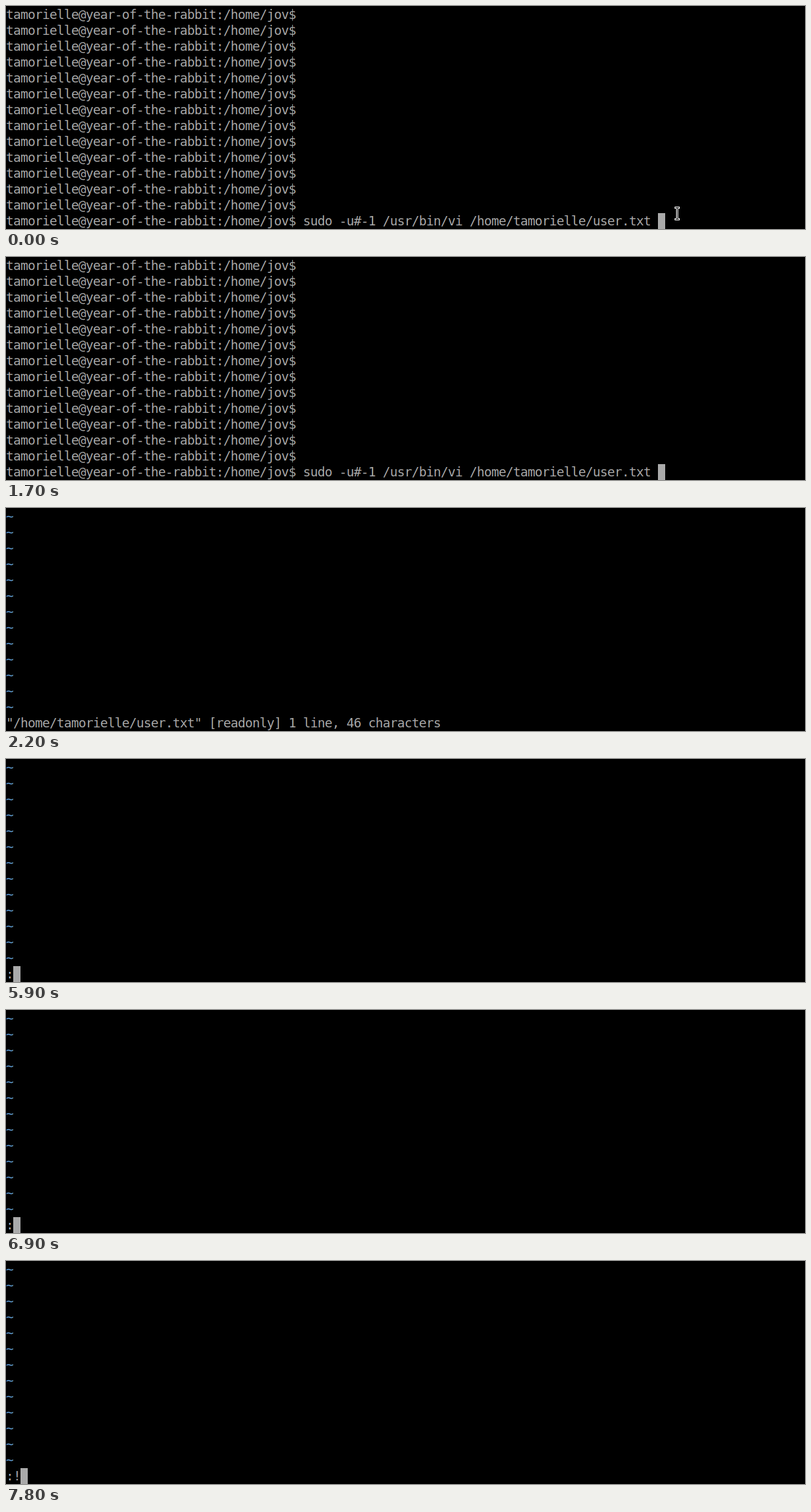
An HTML page with a canvas that plays this animation: 1103 by 309 pixels, repeating every 8000 ms.

```html
<!DOCTYPE html>
<html lang="en">
<head>
<meta charset="utf-8">
<title>Terminal session</title>
<style>
  html, body { margin: 0; width: 100%; height: 100%; overflow: hidden; background: #000; }
  canvas { display: block; }
</style>
</head>
<body>
<canvas id="screen" width="1103" height="309"></canvas>
<script>
const ctx = document.getElementById('screen').getContext('2d', { alpha: false });

const LOOP = 8000;
const CELL_W = 10, CELL_H = 22, TOP = 1, BASELINE = 17;
const LAST_ROW = 13;
const GREY = [170, 170, 170], BLUE = [95, 158, 216];

const PROMPT = 'tamorielle@year-of-the-rabbit:/home/jov$';
const FILE = '/home/tamorielle/user.txt';
const COMMAND = `${PROMPT} sudo -u#-1 /usr/bin/vi ${FILE}`;
const STATUS = `"${FILE}" [readonly] 1 line, 46 characters`;

// Characters sit in terminal cells; the colour channels are a third of a
// pixel apart, like subpixel antialiasing on an RGB screen.
function print(text, row, [r, g, b] = GREY) {
  const y = TOP + row * CELL_H + BASELINE;
  const channels = [[`rgb(${r},0,0)`, 1 / 3], [`rgb(0,${g},0)`, 0], [`rgb(0,0,${b})`, -1 / 3]];
  ctx.globalCompositeOperation = 'lighter';
  for (const [color, shift] of channels) {
    ctx.fillStyle = color;
    [...text].forEach((ch, col) => ctx.fillText(ch, col * CELL_W + shift, y));
  }
  ctx.globalCompositeOperation = 'source-over';
}

function fillRows(text, count, color) {
  for (let row = 0; row < count; row++) print(text, row, color);
}

function block(col) {
  ctx.fillStyle = `rgb(${GREY})`;
  ctx.fillRect(col * CELL_W, TOP + LAST_ROW * CELL_H, CELL_W, CELL_H);
}

function beamPointer(x, y) {
  ctx.fillStyle = '#fff';
  ctx.fillRect(x, y, 7, 3);
  ctx.fillRect(x + 2, y, 3, 19);
  ctx.fillRect(x, y + 16, 7, 3);
  ctx.fillStyle = '#000';
  ctx.fillRect(x + 1, y + 1, 5, 1);
  ctx.fillRect(x + 3, y + 1, 1, 17);
  ctx.fillRect(x + 1, y + 17, 5, 1);
}

const within = (t, from, to) => t >= from && t < to;

function drawShell(t) {
  const entered = t >= 1900;
  const commandRow = entered ? LAST_ROW - 1 : LAST_ROW;
  fillRows(PROMPT, commandRow);
  print(COMMAND, commandRow);
  if (entered) block(0);
  else if (!within(t, 600, 1200)) block(COMMAND.length + 1);
  if (t < 1700) beamPointer(923, 278);
}

function drawEditor(t) {
  fillRows('~', LAST_ROW, BLUE);
  if (t < 5900) {
    print(STATUS, LAST_ROW);
    return;
  }
  const typed = t < 7800 ? ':' : ':!';
  print(typed, LAST_ROW);
  const hidden = within(t, 6300, 6900) || within(t, 7500, 7600);
  if (!hidden) block(typed.length);
}

function draw(now) {
  const t = now % LOOP;
  ctx.fillStyle = '#000';
  ctx.fillRect(0, 0, 1103, 309);
  ctx.font = '17.8px "DejaVu Sans Mono", monospace';
  ctx.textBaseline = 'alphabetic';
  if (t < 2200) drawShell(t);
  else drawEditor(t);
}

let start;
function tick(now) {
  start ??= now;
  draw(now - start);
  requestAnimationFrame(tick);
}
draw(0);
requestAnimationFrame(tick);
</script>
</body>
</html>
```
